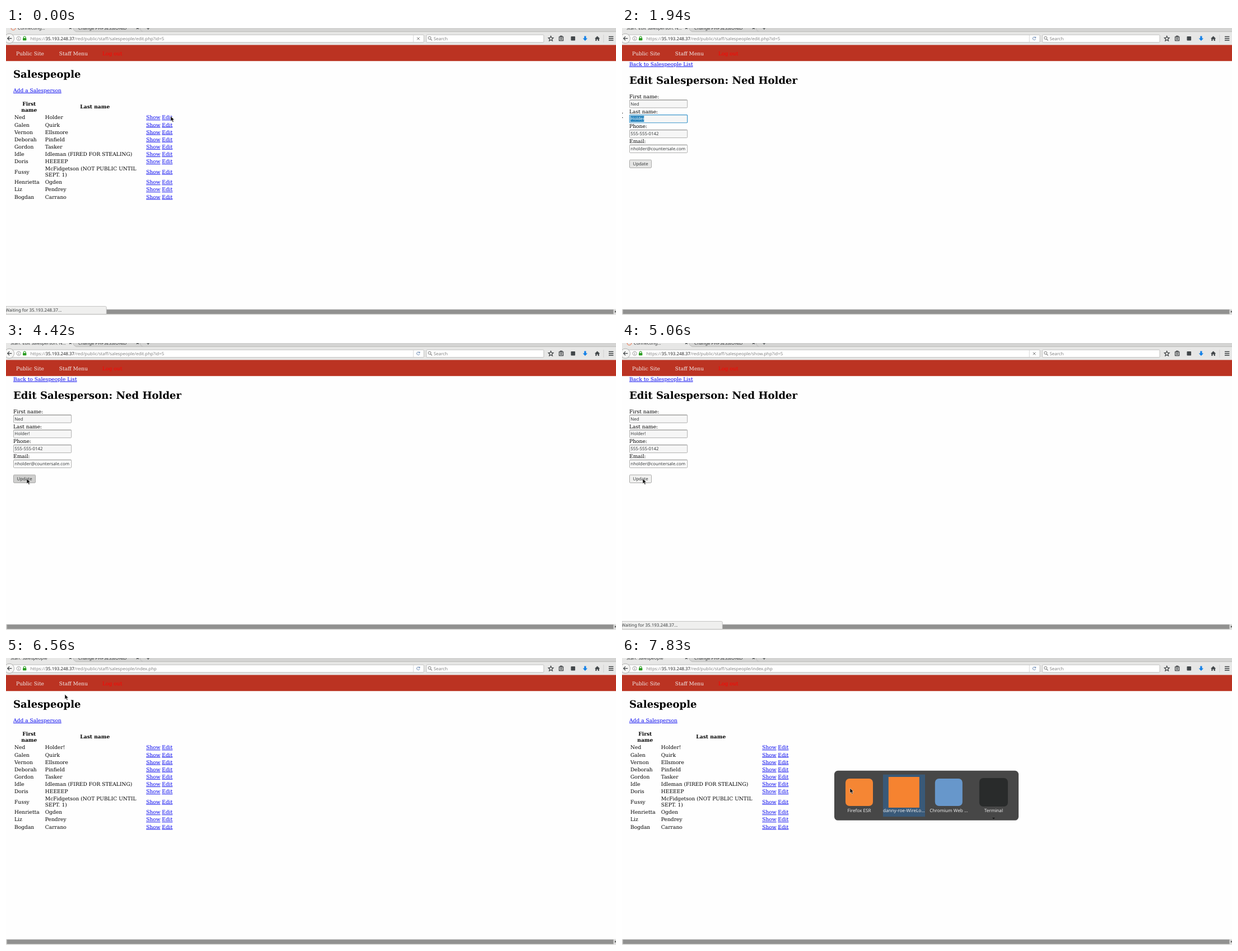
Animation of 1089 by 514 pixels, one loop 8000 ms. Source, as an HTML page:

```html
<!DOCTYPE html>
<html lang="en">
<head>
<meta charset="utf-8">
<title>Salespeople</title>
<style>
html, body { margin: 0; width: 100%; height: 100%; overflow: hidden; background: #fefefe; }
svg { display: block; width: 1089px; height: 514px; }
text { white-space: pre; text-rendering: geometricPrecision; }
.serif { font: 9.15px "DejaVu Serif", serif; fill: #000; }
.ui { font: 7.9px "Noto Sans", sans-serif; fill: #3a3d3e; }
.bold { font-weight: bold; }
.h1 { font-size: 18.1px; font-weight: bold; }
.link { fill: #00e; text-decoration: underline; }
.mid { text-anchor: middle; }
.dim { fill: #858585; }
.label { font-size: 8.15px; fill: #eee; text-anchor: middle; }
.line { fill: none; stroke: #3d4143; stroke-width: 1.2; }
</style>
</head>
<body>
<svg id="stage" viewBox="0 0 1089 514"></svg>
<script>
const LOOP = 8000;
const HOST = '35.193.248.37';
const DIR = '/red/public/staff/salespeople/';
const WAIT = `Waiting for ${HOST}...`;
const FIRST = 'Ned', LAST = 'Holder', PHONE = '555-555-0142', EMAIL = 'nholder@countersale.com';

const people = [
  [FIRST, LAST, 160], ['Galen', 'Quirk', 173.2], ['Vernon', 'Ellsmore', 186.3],
  ['Deborah', 'Pinfield', 199.5], ['Gordon', 'Tasker', 212.6],
  ['Idle', 'Idleman (FIRED FOR STEALING)', 225.8], ['Doris', 'HEEEEP', 239],
  ['Fussy', 'McFidgetson (NOT PUBLIC UNTIL|SEPT. 1)', 257.4],
  ['Henrietta', 'Ogden', 276], ['Liz', 'Pendrey', 289.1], ['Bogdan', 'Carrano', 302.2]
];

// time, page, tab title, file in address, status text
const scenes = [
  [0, 'list', 'Connecting...', 'edit.php?id=5', WAIT],
  [120, 'edit', 'Staff: Edit Salesperson: N...', 'edit.php?id=5', ''],
  [4670, 'edit', 'Connecting...', 'show.php?id=5', `Connecting to ${HOST}...`],
  [4820, 'edit', 'Connecting...', 'show.php?id=5', WAIT],
  [5180, 'show', 'Staff: Show Salesperson: ...', 'show.php?id=5', ''],
  [6200, 'show', 'Connecting...', 'show.php?id=5', `https://${HOST}${DIR}index.php`],
  [6320, 'show', 'Connecting...', 'index.php', WAIT],
  [6560, 'list', 'Staff: Salespeople', 'index.php', '']
];

// time, last name, field mode, button mode
const form = [
  [0, LAST, '', ''], [810, LAST, 'caret', ''], [930, LAST, 'select', ''],
  [2710, LAST, 'caret', ''], [3650, LAST + '!', 'caret', 'hover'],
  [4420, LAST + '!', '', 'press'], [4670, LAST + '!', '', 'hover']
];

// time, x, y, shape
const pointer = [
  [0, 294, 158, 'arrow'], [120, 259, 200, 'arrow'], [270, 180, 188, 'arrow'],
  [390, 108, 178, 'arrow'], [510, 74.5, 174, 'arrow'], [660, 74, 174, 'arrow'],
  [810, 56, 164, 'beam'], [930, 34, 162, 'beam'], [1050, 14, 160, 'beam'],
  [1170, -.6, 158, 'beam'], [1320, -.6, 157.5, 'beam'], [1820, -.6, 157, 'beam'],
  [1940, -.6, 156.5, 'beam'], [2440, 62, 154, 'beam'], [2560, 106, 157, 'beam'],
  [2710, 105, 160, 'beam'], [2830, 105, 163, 'beam'], [2950, 105.5, 159, 'beam'],
  [3260, 105.5, 158, 'beam'], [3410, 71.5, 186.3, 'beam'], [3530, 48, 220, 'arrow'],
  [3650, 36, 241, 'arrow'], [3890, 37, 243, 'arrow'], [5300, 44, 205, 'arrow'],
  [5420, 58, 155, 'arrow'], [5540, 73, 105, 'arrow'], [5660, 83, 76, 'arrow'],
  [5810, 92, 71, 'arrow'], [5930, 101, 66, 'hand'], [6050, 105, 65, 'hand'],
  [6560, 105, 65, 'arrow'], [6680, 101, 90, 'arrow'], [6800, 93, 128, 'arrow'],
  [6920, 89, 153, 'arrow'], [7070, 70.5, 186, 'arrow'], [7470, 150, 200, 'arrow'],
  [7590, 290, 222, 'arrow'], [7710, 385, 231, 'arrow'], [7830, 407, 233, 'arrow']
];
const SWITCHER_AT = 7830;

const at = (table, t) => table.findLast(row => row[0] <= t);
const text = (x, y, s, cls = 'serif', extra = '') =>
  `<text x="${x}" y="${y}" class="${cls}" ${extra}>${s}</text>`;
const rect = (x, y, w, h, fill, extra = '') =>
  `<rect x="${x}" y="${y}" width="${w}" height="${h}" fill="${fill}" ${extra}/>`;
const line = (d, extra = '') => `<path d="${d}" class="line" ${extra}/>`;
const link = (x, y, s) => text(x, y, s, 'serif link');

function chrome(title, file, loading, waiting) {
  const tab = loading
    ? `<circle cx="13" cy="0" r="3.8" fill="none" stroke="${waiting ? '#ec7a55' : '#999'}"
        stroke-width="1.1" stroke-dasharray="${waiting ? '15 9' : '2 1'}"/>` + text(21, 2.8, title, 'ui')
    : text(8, 2.8, title, 'ui');
  const control = loading
    ? line('M733.7 16.6l4.8 4.8m0-4.8l-4.8 4.8', 'style="stroke:#777;stroke-width:1"')
    : line('M738.3 17.2a2.7 2.7 0 1 0 .2 2.7M738.7 15.5v2.3h-2.4', 'style="stroke:#6484b0;stroke-width:1"');
  return rect(0, 0, 1089, 31, '#e7e7e6') + rect(0, 0, 1089, 7, '#d4d4d3')
    + '<path d="M0 0H119Q121 5 125 7H0Z" fill="#e7e7e6"/>'
    + '<path d="M119 0Q121 5 125 6.6H1089M239 0Q240 5 244 6.6" fill="none" stroke="#b5b5b4" stroke-width=".8"/>'
    + tab + text(129, 2.8, 'Change PHPSESSIONID', 'ui')
    + line('M113 -2l3.8 3.8m0-3.8l-3.8 3.8M233 -2l3.8 3.8m0-3.8l-3.8 3.8M251 0h5.4M253.7 0v3')
    + rect(8, 12.2, 738, 13.6, '#fff', 'rx="1.5" stroke="#b3b3b2" stroke-width=".8"')
    + '<circle cx="6" cy="18.7" r="8.6" fill="#f5f5f4" stroke="#a9a9a8" stroke-width=".9"/>'
    + line('M10.3 18.7H3M6.2 15.2L2.7 18.7L6.2 22.2', 'stroke-width="1.5"')
    + '<circle cx="22.7" cy="18.8" r="3.6" fill="none" stroke="#888" stroke-width=".8"/>'
    + rect(22.2, 18.2, 1, 2.8, '#888') + rect(22.2, 16.5, 1, 1, '#888')
    + rect(30, 18, 6.4, 4.3, '#2b9d22', 'rx=".7"')
    + line('M31.3 18.2v-1.3a1.9 1.9 0 0 1 3.8 0v1.3', 'style="stroke:#2b9d22"')
    + text(43.4, 21.6, `https://<tspan fill="#222">${HOST}</tspan>${DIR}${file}`, 'ui dim')
    + rect(726.8, 12.5, .7, 13, '#c5c5c5') + control
    + rect(750.4, 12.2, 209.6, 13.6, '#fff', 'rx="1.5" stroke="#b3b3b2" stroke-width=".8"')
    + '<circle cx="756.2" cy="17.8" r="2.5" fill="none" stroke="#777"/>'
    + line('M758 19.8l2.6 2.6', 'style="stroke:#777"') + text(763.5, 21.6, 'Search', 'ui dim')
    + line('M972.7 14.5l1.3 2.9 3.1.3-2.3 2.1.7 3.2-2.8-1.7-2.8 1.7.7-3.2-2.3-2.1 3.1-.3z')
    + line('M987.5 15.8h7.2v6.8h-7.2zM989.5 15.3v-1h3.2v1M989 18.2h4.2M989 20.4h4.2')
    + rect(1008.5, 15, 7.6, 7.6, '#42474a', 'rx="1"')
    + '<path d="M1032.3 14.5h3.2v4h2.6l-4.2 4.5-4.2-4.5h2.6z" fill="#1180e8"/>'
    + '<path d="M1051 19l4.6-4.5 4.6 4.5h-1.3v4h-2.2v-2.8h-2.2V23h-2.2v-4z" fill="#42474a"/>'
    + line('M1076 15.6h8.4M1076 18.8h8.4M1076 22h8.4', 'style="stroke-width:1.5"')
    + rect(1066.5, 12, .7, 14, '#c8c8c8')
    + rect(0, 30.4, 1089, 28.8, '#bb3322')
    + text(18, 49, 'Public Site', 'serif', 'style="fill:#f0eeee"')
    + text(94.8, 49, 'Staff Menu', 'serif', 'style="fill:#f0eeee"')
    + text(172, 49, 'Log out', 'serif', 'style="fill:#f00"');
}

function listPage(edited) {
  const rows = people.map(([first, last, y], i) => {
    const parts = (last + (edited && !i ? '!' : '')).split('|');
    const top = y + 3.3 - (parts.length - 1) * 5.4;
    return text(15, y + 3.3, first) + parts.map((s, n) => text(69.8, top + n * 10.8, s)).join('')
      + link(250.2, y + 3.3, 'Show') + link(278.3, y + 3.3, 'Edit');
  });
  return text(13, 89.2, 'Salespeople', 'serif h1') + link(13, 114.9, 'Add a Salesperson')
    + text(41.3, 138.7, 'First', 'serif bold mid') + text(41.3, 149.9, 'name', 'serif bold mid')
    + text(158.8, 144.4, 'Last name', 'serif bold mid') + rows.join('');
}

const back = () => link(13, 67.9, 'Back to Salespeople List');

function editPage(last, mode, button) {
  const fields = [['First name:', FIRST], ['Last name:', last], ['Phone:', PHONE], ['Email:', EMAIL]];
  const body = fields.map(([name, value], i) => {
    const y = 128.7 + i * 26.85, focus = i === 1 && mode;
    const picked = focus && mode === 'select';
    return text(13, y - 3, name)
      + rect(13.5, y, 103.2, 14.2, i === 3 ? '#fcfcfc' : '#f6f6f6',
        `rx="1.2" stroke="${focus ? '#3c97cc' : '#a6a6a5'}" stroke-width="${focus ? 1.2 : .9}"`)
      + (focus ? '' : rect(14, y, 102.2, .8, '#8e8e8d'))
      + (picked ? rect(15, y + 1.7, 24.3, 10.8, '#2483bd') : '')
      + text(15.3, y + 9.9, value, 'ui', picked ? 'style="fill:#fff"' : '')
      + (focus && mode === 'caret' ? rect(value === LAST ? 39.6 : 41.9, y + 2, .8, 10.5, '#111') : '');
  });
  const fill = { '': '#e6e6e5', hover: '#f1f1f0', press: '#cfcfce' }[button];
  return back() + text(13, 100, `Edit Salesperson: ${FIRST} ${LAST}`, 'serif h1') + body.join('')
    + rect(13.5, 236.2, 39, 14.2, fill, 'rx="1.3" stroke="#a1a1a0" stroke-width=".9"')
    + text(33, 246.1, 'Update', 'ui mid');
}

function showPage(clicked) {
  const rows = [['Name:', `${FIRST} ${LAST}!`], ['Phone:', PHONE], ['Email:', EMAIL]];
  return back()
    + (clicked ? rect(12.8, 60.3, 114, 10, 'none', 'stroke="#22e" stroke-width=".7" stroke-dasharray="1 1"') : '')
    + text(13, 100, `Salesperson: ${FIRST} ${LAST}!`, 'serif h1')
    + rows.map(([k, v], i) => text(15, 127.6 + i * 13.1, k) + text(48.8, 127.6 + i * 13.1, v)).join('')
    + link(13, 177.2, 'Edit');
}

function footer(status) {
  const hover = status.startsWith('http');
  const w = hover ? 222.5 : 179.3;
  return rect(0, 503.5, 1089, 10.5, '#dcdcdb') + rect(1.5, 504.3, 1083, 8, '#919190')
    + '<path d="M1087 506l2 2-2 2z" fill="#333"/>' + rect(0, 513, 1089, 1, '#efefee')
    + (status ? `<path d="M0 498.5H${w - 2}Q${w} 498.5 ${w} 500.5V512.6H0Z" fill="#efefee" stroke="#b9b9b8" stroke-width=".8"/>`
      + text(-1.5, 508.3, status, 'ui', hover ? 'style="fill:#777"' : '') : '');
}

function switcher() {
  const apps = [
    [423.5, 'Firefox ESR', 49, '#f58634', 240.5], [503.3, 'danny-roe-WireLo...', 55, '#f68330', 240.5],
    [583.3, 'Chromium Web ...', 49, '#6797cb', 240.5], [663.4, 'Terminal', 51, '#292b2b', 240.5]
  ];
  return rect(379, 201.8, 329, 89, '#474747', 'rx="6.5"') + rect(466, 208.7, 75, 75.5, '#395978')
    + apps.map(([x, name, size, fill, y]) =>
      rect(x - size / 2, y - size / 2, size, size, fill, size === 55 ? '' : 'rx="7"')
      + text(x, 276.1, name, 'ui label')).join('')
    + '<path d="M661 286h4.8l-2.4 2.6z" fill="#111"/>';
}

const shapes = {
  arrow: '<path d="M0 0V9L2.1 7.1L3.6 10.5L5.2 9.8L3.7 6.5H6.5Z" fill="#111" stroke="#fff" stroke-width=".5"/>',
  beam: '<path d="M-2.2 -4.2Q0 -4.2 0 -3V3Q0 4.2 -2.2 4.2M2.2 -4.2Q0 -4.2 0 -3M0 3Q0 4.2 2.2 4.2" fill="none" stroke="#333" stroke-width="1"/>',
  hand: '<path d="M1.3 0Q2.4 -.5 2.5 1V3.2L5.4 3.8Q6.6 4.2 6.3 5.5L5.7 8.5H2L-.6 5.3Q-.8 4.2 1.2 5Z" fill="#111" stroke="#fff" stroke-width=".5"/>'
};

function draw(t) {
  const [, page, title, file, status] = at(scenes, t);
  const [, last, mode, button] = at(form, t);
  const [, x, y, shape] = at(pointer, t);
  const loading = title === 'Connecting...';
  const body = page === 'list' ? listPage(t >= 6560)
    : page === 'edit' ? editPage(last, mode, button) : showPage(loading);
  return rect(0, 0, 1089, 514, '#fefefe') + chrome(title, file, loading, status === WAIT)
    + body + footer(status) + (t >= SWITCHER_AT ? switcher() : '')
    + `<g transform="translate(${x} ${y})">${shapes[shape]}</g>`;
}

const stage = document.getElementById('stage');
const start = performance.now();
let shown = '';
function tick() {
  const next = draw((performance.now() - start) % LOOP);
  if (next !== shown) stage.innerHTML = shown = next;
  requestAnimationFrame(tick);
}
tick();
</script>
</body>
</html>
```
